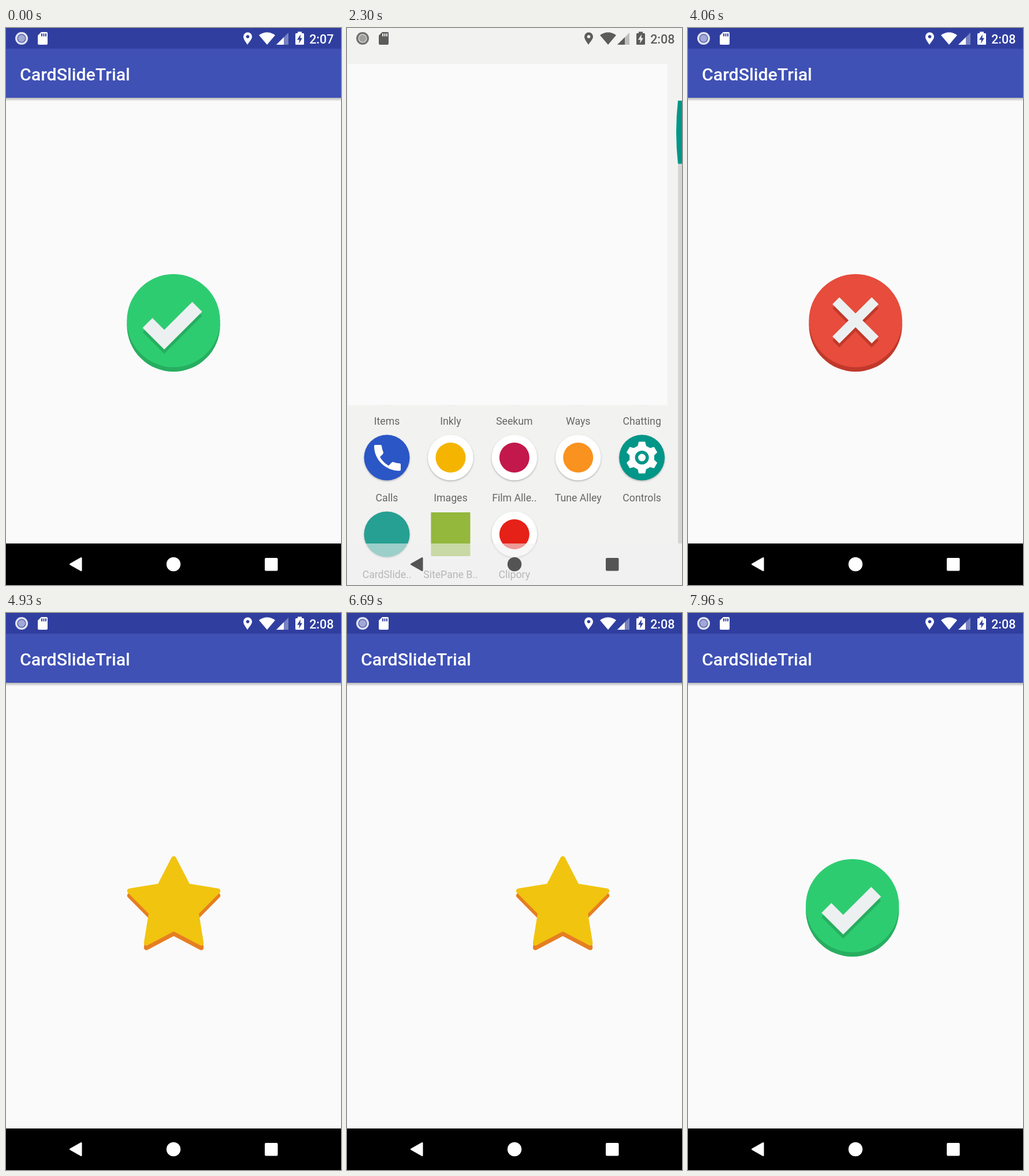
Recreate the animation shown at these times as an HTML page with a canvas. Size 580 by 966 pixels, loop 8000 ms.

```html
<!DOCTYPE html>
<html lang="en">
<head>
<meta charset="utf-8">
<title>Pager demo</title>
<style>
html, body { margin: 0; width: 100%; height: 100%; overflow: hidden; background: #fafafa; }
canvas { display: block; width: 580px; height: 966px; }
</style>
</head>
<body>
<canvas id="stage" width="580" height="966"></canvas>
<script>
const ctx = document.getElementById('stage').getContext('2d');
const W = 580, H = 966, LOOP = 8000, TOP = 121, NAV = 894;
const TEAL = '#009688', BLUE = '#2a56c6', PAPER = '#fafafa', HOME = '#f2f2f1';
const clamp = v => Math.max(0, Math.min(1, v));
const easeOut = (v, p) => 1 - Math.pow(1 - clamp(v), p);

// ---------- drawing helpers ----------
function rect(x, y, w, h, color) {
  ctx.fillStyle = color;
  ctx.fillRect(x, y, w, h);
}
function round(x, y, w, h, r, color) {
  ctx.fillStyle = color;
  ctx.beginPath();
  ctx.roundRect(x, y, w, h, r);
  ctx.fill();
}
function disc(x, y, r, color) {
  ctx.fillStyle = color;
  ctx.beginPath();
  ctx.arc(x, y, r, 0, Math.PI * 2);
  ctx.fill();
}
function trace(points, closed) {
  ctx.beginPath();
  points.forEach(([x, y]) => ctx.lineTo(x, y));
  if (closed) ctx.closePath();
}
function poly(points, color) {
  trace(points, true);
  ctx.fillStyle = color;
  ctx.fill();
}
function line(points, width, color) {
  trace(points);
  ctx.lineWidth = width;
  ctx.strokeStyle = color;
  ctx.stroke();
}
function path(d, color) {
  ctx.fillStyle = color;
  ctx.fill(new Path2D(d));
}
function text(s, x, y, size, color, align = 'left', weight = 400) {
  ctx.font = `${weight} ${size}px Roboto, sans-serif`;
  ctx.textAlign = align;
  ctx.fillStyle = color;
  ctx.fillText(s, x, y);
}
function at(x, y, draw) {
  ctx.save();
  ctx.translate(x, y);
  draw();
  ctx.restore();
}
function gear(r, teeth, color) {
  disc(0, 0, r * 0.78, color);
  for (let i = 0; i < teeth; i++) {
    ctx.save();
    ctx.rotate(i * 2 * Math.PI / teeth);
    poly([[-r * .3, -r * .6], [-r * .2, -r], [r * .2, -r], [r * .3, -r * .6]], color);
    ctx.restore();
  }
}

// ---------- system bars ----------
function statusBar(time, fg, bg) {
  ctx.globalAlpha *= 0.85;
  disc(27, 18, 11, fg);
  ctx.globalAlpha /= 0.85;
  disc(27, 18, 7.5, bg);
  ctx.globalAlpha *= 0.55;
  disc(27, 18, 6.5, fg);
  ctx.globalAlpha /= 0.55;
  path('M61 7H70Q72 7 72 9V27Q72 29 70 29H57Q55 29 55 27V13Z', fg);
  [61, 64.5, 68].forEach(x => rect(x, 9.5, 2, 5, bg));
  path('M418 29C414 23 411 19 411 15A7.5 7.5 0 0 1 426 15C426 19 422 23 418 29Z', fg);
  disc(418.5, 15, 2.8, bg);
  path('M438 12.5Q452 2.5 466 12.5L452 29Z', fg);
  ctx.globalAlpha *= 0.35;
  poly([[468, 29], [489, 8], [489, 29]], fg);
  ctx.globalAlpha /= 0.35;
  poly([[468, 29], [481, 16], [481, 29]], fg);
  round(501, 9, 15, 20, 1.5, fg);
  rect(505, 6.5, 7, 4, fg);
  poly([[510, 11], [504, 20.5], [508, 20.5], [507, 27], [513, 17.5], [509.5, 17.5]], bg);
  text(time, 567.5, 26.5, 21.5, fg, 'right', 500);
}
function navKeys(color) {
  ctx.lineJoin = 'round';
  poly([[111.5, 930], [130, 919.5], [130, 940.5]], color);
  ctx.lineWidth = 3;
  ctx.strokeStyle = color;
  ctx.stroke();
  disc(290, 930, 12.2, color);
  round(448, 919, 22.5, 22.5, 2, color);
}

// ---------- pager app ----------
function badge(color, shade) {
  disc(290, 515.3, 80.7, shade);
  disc(290, 507.5, 80.7, color);
}
function checkPage() {
  badge('#2ecc71', '#27ae60');
  const mark = [[236.5, 520], [253.5, 503], [274, 523.5], [322.5, 475], [339.5, 492], [274, 557.5]];
  poly(mark.map(([x, y]) => [x, y + 7.5]), '#27ae60');
  poly(mark, '#ecf0f1');
}
function crossPage() {
  badge('#e74c3c', '#c0392b');
  [[7, '#c0392b'], [0, '#ecf0f1']].forEach(([dy, color]) => {
    line([[256, 473 + dy], [324, 541 + dy]], 17, color);
    line([[324, 473 + dy], [256, 541 + dy]], 17, color);
  });
}
function starPage() {
  const half = [[0, 426], [24.5, 473.5], [76.5, 482], [39, 520], [47.5, 572.5]];
  const left = half.slice(1).reverse().map(([x, y]) => [-x, y]);
  const star = [...half, [0, 547.5], ...left];
  ctx.lineJoin = 'round';
  [[8, '#e67e22'], [0, '#f1c40f']].forEach(([dy, color]) => {
    poly(star.map(([x, y]) => [x + 290, y + dy]), color);
    ctx.lineWidth = 8.5;
    ctx.strokeStyle = color;
    ctx.stroke();
  });
}
const pages = [checkPage, crossPage, starPage];

// A short linear drag, then a quintic settle onto the next page.
function swipe(t, start, drag, settle) {
  const d = t - start;
  if (d <= 0) return 0;
  if (d < drag) return 0.26 * d / drag;
  return 0.26 + 0.74 * easeOut((d - drag) / settle, 5);
}
const pagePos = t => swipe(t, 3460, 140, 560) + swipe(t, 4670, 60, 270)
  - swipe(t, 6640, 92, 700) - swipe(t, 7550, 90, 550);

// Edge glow: a flattened circle segment that grows on pull and recedes on release.
function edgeGlow(t) {
  if (t < 5520 || t > 6600) return;
  const pull = easeOut((t - 5520) / 240, 2);
  const level = pull * (1 - easeOut((t - 6010) / 590, 2));
  const r = 1158, depth = 155, half = (NAV - TOP) / 2, mid = TOP + half;
  const edge = [[W, TOP]];
  for (let i = -24; i <= 24; i++) {
    const dy = half * i / 24;
    edge.push([W - 0.65 * level * (depth - r + Math.sqrt(r * r - dy * dy)), mid + dy]);
  }
  edge.push([W, NAV]);
  ctx.save();
  ctx.globalAlpha = 0.49 * level;
  poly(edge, '#3f51b5');
  ctx.restore();
}
function app(t, time) {
  rect(0, 0, W, H, PAPER);
  const pos = pagePos(t);
  pages.forEach((draw, i) => {
    const x = (i - pos) * W;
    if (Math.abs(x) < W) at(x, 0, draw);
  });
  edgeGlow(t);
  const shadow = ctx.createLinearGradient(0, TOP, 0, TOP + 6);
  shadow.addColorStop(0, 'rgba(0,0,0,.28)');
  shadow.addColorStop(1, 'rgba(0,0,0,0)');
  rect(0, TOP, W, 6, shadow);
  rect(0, 36, W, TOP - 36, '#3f51b5');
  rect(0, 0, W, 36, '#303f9f');
  text('CardSlideTrial', 24, 90.5, 30.3, '#fff', 'left', 500);
  statusBar(time, '#fff', '#303f9f');
  rect(0, NAV, W, H - NAV, '#000');
  navKeys('#fff');
}

// ---------- launcher ----------
function plate(color) {
  ctx.save();
  ctx.shadowColor = 'rgba(0,0,0,.28)';
  ctx.shadowBlur = 3;
  ctx.shadowOffsetY = 1.5;
  disc(0, 0, 39.5, color);
  ctx.restore();
}
const solid = color => () => plate(color);
const dotted = color => () => { plate('#fff'); disc(0, 0, 26, color); };

function sums() {
  plate('#fff');
  rect(-20, -18, 18.5, 17, '#4a4a4a');
  rect(-20, 0, 18.5, 18, '#333');
  rect(0, -18, 20, 36, '#262626');
  rect(-15, -10, 9, 2, '#fff');
  rect(-15, 8, 9, 2, '#fff');
  rect(-11.5, 4.5, 2, 9, '#fff');
  rect(6, -3, 8, 2, '#fff');
  rect(6, 1, 8, 2, '#fff');
}
function datePad() {
  plate('#fff');
  round(-23, -27, 46, 12, 2, '#bdbdbd');
  round(-25.5, -19, 51, 44, 2, '#3f78e0');
  rect(-24, 4, 48, 21, '#3567cc');
  text('13', 0, 14, 31, '#fff', 'center', 300);
}
function dial() {
  plate('#a8bfe6');
  disc(0, 0, 34, '#4a86f0');
  ctx.lineCap = 'round';
  line([[-28, -14], [0, 0], [33, -17]], 3.5, '#fff');
  line([[0, 0], [0, 38]], 2, '#d84848');
  disc(0, 0, 3, '#d84848');
  ctx.lineCap = 'butt';
}
function person() {
  plate(BLUE);
  disc(0, -13, 10.5, '#fff');
  path('M-21 21V15C-21 6-9 2 0 2S21 6 21 15V21Z', '#fff');
}
function cog() {
  plate('#fff');
  ctx.rotate(0.2);
  at(1, 2, () => gear(27, 8, '#8c8c8c'));
  gear(26, 8, '#c4c4c4');
  disc(0, 0, 11, '#f57c1f');
  disc(0, 0, 6.5, '#e8e8e8');
}
function folder() {
  plate('#06a5ee');
  round(-21, -17, 20, 12, 3, '#fff');
  round(-21, -12.5, 43, 30, 3, '#fff');
}
function bubble() {
  plate(BLUE);
  poly([[-31, -21], [-10, -21], [-20, -8]], '#fff');
  round(-23, -21, 48, 40, 4, '#fff');
  [-11, -3, 5].forEach((y, i) => round(-13, y, i < 2 ? 29 : 20, 3.6, 1, '#9db4e0'));
}
function handset() {
  plate(BLUE);
  path('M-20 -22H-11Q-9 -22-9 -20Q-8-13-6-9Q-6-7-7-6L-12-1Q-6 9 3 14L9 8Q10 7 12 8' +
    'Q17 10 22 10Q24 10 24 12V21Q24 23 22 23C-2 23-22 4-22-20Q-22-22-20-22Z', '#fff');
}
function controls() {
  plate(TEAL);
  gear(27.5, 6, '#fff');
  disc(0, 0, 12, TEAL);
  disc(0, 0, 6.5, '#fff');
}
const cardIcon = solid('#26a092'), clipIcon = dotted('#e62117'), webIcon = solid('#dd4b3e');
const mailIcon = dotted('#dc4a3d'), tuneIcon = dotted('#f9921e');

const rows = [
  [188, [['CardSlide..', cardIcon], ['Clipory', clipIcon], ['Wander', webIcon],
    ['Inkly', mailIcon], ['Tune Alley', tuneIcon]]],
  [346, [['Number Pad', sums], ['Datebook', datePad], ['Lenses', solid('#6fa5b0')],
    ['Wander', webIcon], ['Timer', dial]]],
  [479, [['Callbook', person], ['Region Se..', cog], ['Code Kits', cog],
    ['Stash', dotted('#fbc02d')], ['Pip', solid('#447ee0')]]],
  [612, [['Items', folder], ['Inkly', mailIcon], ['Seekum', dotted('#4285f4')],
    ['Ways', solid('#1f9d58')], ['Chatting', bubble]]],
  [745, [['Calls', handset], ['Images', dotted('#f4b400')], ['Film Alle..', dotted('#c2184b')],
    ['Tune Alley', tuneIcon], ['Controls', controls]]],
  [878, [['CardSlide..', cardIcon], ['SitePane B..', () => rect(-34, -38, 68, 76, '#93b83c')],
    ['Clipory', clipIcon]]]
];

function launcher() {
  rect(0, 0, W, H, HOME);
  ctx.lineWidth = 3;
  ctx.strokeStyle = TEAL;
  ctx.beginPath();
  ctx.arc(215, 87, 7.5, 0, Math.PI * 2);
  ctx.stroke();
  line([[220, 92], [229, 101]], 3.6, TEAL);
  text('Search Apps', 241, 99.5, 25, TEAL);
  rect(27, 126.5, 526, 2, TEAL);
  rect(27, 285.5, 526, 1.5, '#cdd0c8');
  rows.forEach(([y, items]) => items.forEach(([label, draw], i) => {
    const x = 69 + i * 110.4;
    at(x, y, draw);
    text(label, x, y + 76, 17.7, '#666', 'center');
  }));
  rect(573, 180, 7, NAV - 180, '#d5d5d4');
  path('M580 126H573Q567 180 573 235.5H580Z', TEAL);
  ctx.save();
  ctx.globalAlpha = 0.58;
  rect(0, NAV, W, H - NAV, HOME);
  ctx.restore();
  statusBar('2:08', '#5c5c5c', HOME);
  navKeys('#545454');
}

// ---------- timeline ----------
function closing(t) {
  launcher();
  const k = clamp((t - 30) / 350);
  if (k === 1) return;
  ctx.save();
  ctx.globalAlpha = 1 - k;
  ctx.translate(0, 80 * k * k);
  app(t, '2:07');
  ctx.restore();
}
// Blank window spreads out of the tapped icon, faster sideways than vertically.
function opening(t) {
  launcher();
  const k = (t - 2170) / 340;
  const kx = easeOut(k, 6), ky = easeOut(k, 1.77);
  const x = 29 * (1 - kx), y = 148 * (1 - ky);
  const right = 109 + 471 * kx, bottom = 228 + 738 * ky;
  rect(x, y, right - x, bottom - y, PAPER);
}
function render(t) {
  ctx.clearRect(0, 0, W, H);
  if (t < 40) app(t, '2:07');
  else if (t < 2170) closing(t);
  else if (t < 2500) opening(t);
  else app(t, '2:08');
}
function loop() {
  render(performance.now() % LOOP);
  requestAnimationFrame(loop);
}
loop();
</script>
</body>
</html>
```
